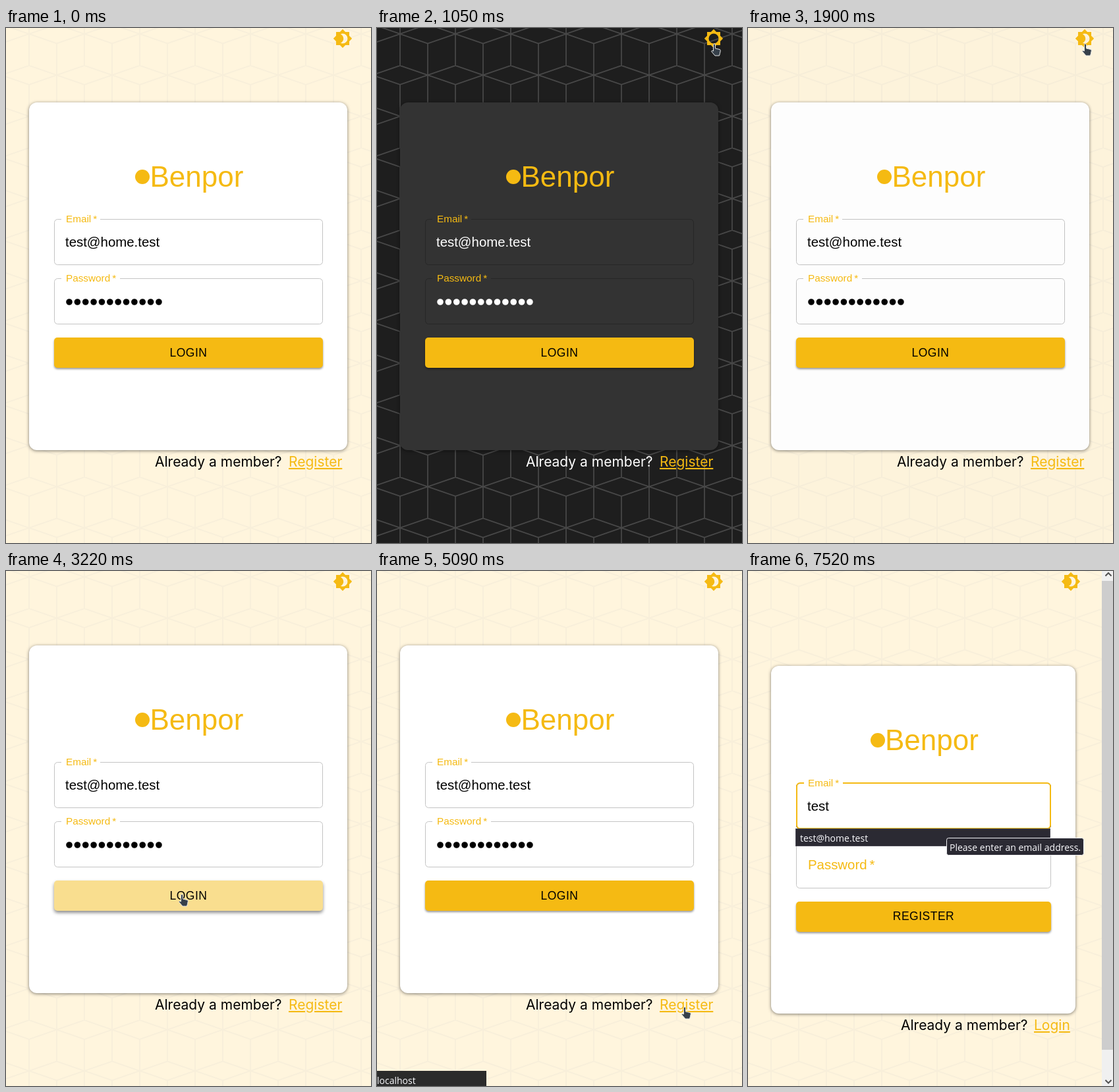
An HTML page that plays this animation: 554x782 px, repeating every 8000 ms.

```html
<!DOCTYPE html>
<html lang="en">
<head>
<meta charset="utf-8">
<title>Sign in</title>
<style>
  html, body { margin: 0; width: 100%; height: 100%; overflow: hidden; background: #fff5dd; }
  svg {
    display: block; width: 554px; height: 782px;
    --gold: #f5ba13; --card: #fff; --ink: #000; --edge: #c4c4c4;
    --bg: #fff5dd; --grid: url(#light-cubes);
    font: 20.4px "Liberation Sans", Arial, sans-serif;
  }
  .dark { --card: #333; --ink: #fff; --edge: #272727; --bg: #1e1e1e; --grid: url(#dark-cubes); }

  .bg { fill: var(--bg); }
  .grid { fill: var(--grid); }
  .card { fill: var(--card); filter: drop-shadow(0 1px 2.5px rgba(0, 0, 0, .5)); }
  .notch { fill: var(--card); }
  .box { fill: none; stroke: var(--edge); }
  .ink { fill: var(--ink); }
  .gold { fill: var(--gold); }
  .dots { stroke: var(--ink); stroke-width: 9.6; stroke-linecap: round; stroke-dasharray: 0 12.36; }
  .title { font-size: 44px; }
  .small { font-size: 15.3px; }
  .caption { font-size: 17.5px; letter-spacing: .5px; text-anchor: middle; }
  .foot { font: 21px Inter, "Open Sans", sans-serif; }
  .link { fill: var(--gold); text-decoration: underline; text-decoration-thickness: 1px; }
  .ui { font: 14px "Open Sans", "Noto Sans", sans-serif; fill: #fbfbfe; }
  .button { fill: var(--gold); filter: drop-shadow(0 2px 1.5px rgba(0, 0, 0, .4)); }

  /* all clips share one 8 s clock */
  .a { animation: 8s step-end infinite; }
  .smooth { animation: 8s cubic-bezier(.4, 0, .2, 1) infinite; }

  .login-page { animation-name: login-page; }
  .register-page { animation-name: register-page; }
  .dark { animation-name: dark; }
  .moon { animation-name: moon; }
  .sun { animation-name: sun; }
  .hover { animation-name: hover; }
  .status { animation-name: status; }
  .hot { animation-name: hot; }
  .focus { animation-name: focus; }
  .label { animation-name: label; animation-timing-function: cubic-bezier(0, 0, .2, 1); }
  .typing { animation-name: typing; }
  .list { animation-name: list; }
  .tip { animation-name: tip; }
  .pointer { animation-name: pointer; animation-timing-function: linear; }
  .hand { animation-name: hand; }
  .arrow { animation-name: arrow; }
  .beam { animation-name: beam; }

  @keyframes login-page { 0% { opacity: 1 } 64.375%, 100% { opacity: 0 } }
  @keyframes register-page { 0% { opacity: 0 } 64.375%, 100% { opacity: 1 } }
  @keyframes dark {
    0%, 9.625% { opacity: 0 }
    13.375%, 20.5% { opacity: 1 }
    24.25%, 100% { opacity: 0 }
  }
  @keyframes moon { 0% { opacity: 1 } 9.625% { opacity: 0 } 20.5%, 100% { opacity: 1 } }
  @keyframes sun { 0% { opacity: 0 } 9.625% { opacity: 1 } 20.5%, 100% { opacity: 0 } }
  @keyframes hover {
    0%, 36.9% { fill: #f5ba13; filter: drop-shadow(0 2px 1.5px rgba(0, 0, 0, .4)) }
    40.1%, 53.5% { fill: #f9de8f; filter: drop-shadow(0 3px 2.5px rgba(0, 0, 0, .45)) }
    56.7%, 100% { fill: #f5ba13; filter: drop-shadow(0 2px 1.5px rgba(0, 0, 0, .4)) }
  }
  @keyframes status { 0% { opacity: 0 } 61.25% { opacity: 1 } 64.375%, 100% { opacity: 0 } }
  @keyframes hot { 0% { stroke: #c4c4c4 } 71.625%, 100% { stroke: #212121 } }
  @keyframes focus { 0% { opacity: 0 } 79.875%, 100% { opacity: 1 } }
  @keyframes label {
    0%, 79.875% { transform: translate(91px, 363px) }
    82.375%, 100% { transform: translate(91px, 327px) scale(.75) }
  }
  @keyframes typing {
    0% { width: 0 }
    86.5% { width: 8px }
    88.125% { width: 19px }
    89.875% { width: 29px }
    93.125%, 100% { width: 40px }
  }
  @keyframes list { 0% { opacity: 0 } 87.3%, 100% { opacity: 1 } }
  @keyframes tip { 0% { opacity: 0 } 90.625%, 100% { opacity: 1 } }
  @keyframes pointer {
    0%, .8% { transform: translate(570px, 800px) }
    .875% { transform: translate(544px, 768px); animation-timing-function: ease-out }
    5.625%, 32.125% { transform: translate(512px, 24px); animation-timing-function: ease-in-out }
    36.25% { transform: translate(285px, 543px) }
    37% { transform: translate(277px, 512px); animation-timing-function: ease-out }
    38.75%, 52.75% { transform: translate(267px, 491px); animation-timing-function: ease-in-out }
    58.5%, 60.25% { transform: translate(35px, 670px); animation-timing-function: ease-out }
    61.875%, 64.375% { transform: translate(467px, 662px); animation-timing-function: ease-in-out }
    68.375%, 70.875% { transform: translate(31px, 352px); animation-timing-function: ease-out }
    73.375% { transform: translate(300px, 356px) }
    75.75%, 100% { transform: translate(297px, 366px) }
  }
  @keyframes hand {
    0% { opacity: 0 }
    5% { opacity: 1 }
    32.9% { opacity: 0 }
    36.9% { opacity: 1 }
    53.5% { opacity: 0 }
    61.25% { opacity: 1 }
    64.375%, 100% { opacity: 0 }
  }
  @keyframes arrow {
    0% { opacity: 1 }
    5% { opacity: 0 }
    32.9% { opacity: 1 }
    36.9% { opacity: 0 }
    53.5% { opacity: 1 }
    61.25% { opacity: 0 }
    64.375% { opacity: 1 }
    71.2%, 100% { opacity: 0 }
  }
  @keyframes beam { 0% { opacity: 0 } 71.2% { opacity: 1 } 86.5%, 100% { opacity: 0 } }
</style>
</head>
<body>
<svg viewBox="0 0 554 782" xmlns="http://www.w3.org/2000/svg">
  <defs>
    <path id="cubes" fill="none" d="M0 0L84 29M84 0L0 29M0 77L42 62.5 84 77 42 91.5ZM0 29V125M84 29V125M42 0V62.5M42 91.5V125"/>
    <pattern id="light-cubes" patternUnits="userSpaceOnUse" x="35" y="57" width="84" height="125">
      <use href="#cubes" stroke="#f8efda" stroke-width="2"/>
    </pattern>
    <pattern id="dark-cubes" patternUnits="userSpaceOnUse" x="35" y="57" width="84" height="125">
      <use href="#cubes" stroke="#484848" stroke-width="1.7"/>
    </pattern>
    <path id="star" d="M20 8.69V4h-4.69L12 .69 8.69 4H4v4.69L.69 12 4 15.31V20h4.69L12 23.31 15.31 20H20v-4.69L23.31 12Z"/>
    <g id="moon" fill-rule="evenodd" transform="translate(496 1) scale(1.25)">
      <path d="M20 8.69V4h-4.69L12 .69 8.69 4H4v4.69L.69 12 4 15.31V20h4.69L12 23.31 15.31 20H20v-4.69L23.31 12ZM12 18c-.89 0-1.74-.2-2.5-.55C11.56 16.5 13 14.42 13 12s-1.44-4.5-3.5-5.45C10.26 6.2 11.11 6 12 6a6 6 0 0 1 0 12Z"/>
    </g>
    <clipPath id="typed"><rect class="a typing" x="88" y="340" width="0" height="34"/></clipPath>
  </defs>

  <g id="backdrop">
    <rect class="bg" width="554" height="782"/>
    <rect class="grid" width="554" height="782"/>
  </g>

  <g class="a login-page">
    <g id="login">
      <rect class="card" x="35" y="113" width="483" height="528" rx="12"/>
      <circle class="gold" cx="207" cy="226" r="11"/>
      <text class="gold title" x="218.5" y="241">Benpor</text>

      <rect class="box" x="73.5" y="290.5" width="407" height="69" rx="5"/>
      <rect class="notch" x="84" y="288" width="59" height="5"/>
      <text class="gold small" x="91" y="295">Email&#8201;*</text>
      <text class="ink" x="90" y="332">test@home.test</text>

      <rect class="box" x="73.5" y="380.5" width="407" height="69" rx="5"/>
      <rect class="notch" x="84" y="378" width="89" height="5"/>
      <text class="gold small" x="91" y="385">Password&#8201;*</text>
      <path class="dots" d="M96 416H232.5"/>

      <rect class="button smooth hover" x="73" y="470" width="408" height="46" rx="5"/>
      <text class="caption" x="277" y="499">LOGIN</text>

      <text class="ink foot" x="226" y="666">Already a member?</text>
      <text class="foot link" x="429" y="666">Register</text>
    </g>
    <g class="smooth dark">
      <use href="#backdrop"/>
      <use href="#login"/>
    </g>
    <g class="gold">
      <use class="a moon" href="#moon"/>
      <g class="a sun">
        <path fill-rule="evenodd" transform="translate(496 1) scale(1.25)" d="M20 8.69V4h-4.69L12 .69 8.69 4H4v4.69L.69 12 4 15.31V20h4.69L12 23.31 15.31 20H20v-4.69L23.31 12ZM12 18a6 6 0 0 1 0-12 6 6 0 0 1 0 12Z"/>
      </g>
    </g>
    <g class="a status">
      <path fill="#2b2b2b" d="M0 759H166V782H0Z"/>
      <text class="ui" x="0" y="779">localhost</text>
    </g>
  </g>

  <g class="a register-page">
    <use class="gold" href="#moon" x="-21"/>
    <rect class="card" x="35" y="144" width="462" height="528" rx="12"/>
    <circle class="gold" cx="197" cy="257" r="11"/>
    <text class="gold title" x="208" y="272">Benpor</text>

    <rect class="box a hot" x="73.5" y="322.5" width="386" height="69" rx="5"/>
    <g class="a focus">
      <rect x="74" y="322" width="385" height="69" rx="5" fill="none" stroke="#f5ba13" stroke-width="2"/>
      <rect class="notch" x="85" y="320" width="59" height="5"/>
    </g>
    <text class="gold smooth label">Email&#8201;*</text>
    <text class="ink" x="90" y="364" clip-path="url(#typed)">test</text>

    <rect class="box" x="73.5" y="412.5" width="386" height="69" rx="5"/>
    <text class="gold" x="91" y="453">Password&#8201;*</text>

    <rect class="button" x="73" y="502" width="387" height="46" rx="5"/>
    <text class="caption" x="266.5" y="530">REGISTER</text>

    <text class="ink foot" x="232" y="697">Already a member?</text>
    <text class="foot link" x="434" y="697">Login</text>

    <path fill="#f0f0f0" d="M537 0H554V782H537Z"/>
    <path fill="#cdcdcd" d="M537 15H554V727H537Z"/>
    <path fill="none" stroke="#505050" stroke-width="2" d="M542.5 7.5L547 3 551.5 7.5M542.5 773L547 777.5 551.5 773"/>

    <g class="a list">
      <rect x="72.5" y="391.5" width="386" height="26" fill="#2b2a33" stroke="#4b4a55"/>
      <text class="ui" x="79" y="411">test@home.test</text>
    </g>
    <g class="a tip">
      <rect x="301.5" y="405.5" width="208" height="26" rx="3" fill="#2b2a33" stroke="#f0f0f4"/>
      <text class="ui" x="306" y="425">Please enter an email address.</text>
    </g>
  </g>

  <g class="smooth pointer" fill="#36404a" stroke="#e6e6e6" stroke-linejoin="round">
    <path class="a hand" d="M-1.5 1.5a1.5 1.5 0 0 1 3 0V7L8 8.500q1.500.5 1.300 2L8.500 14.500 7.500 18H1L-4.500 11.500q.2-2 3-.5Z"/>
    <path class="a arrow" d="M0 0V16L4 12.500 6.500 18 9 17 6.500 11.500H11.500Z"/>
    <path class="a beam" fill="none" stroke="#6a6a6a" stroke-width="1.2" d="M-3.500-8H3.500M-3.500 8H3.500M0-8V8"/>
  </g>
</svg>
</body>
</html>
```
